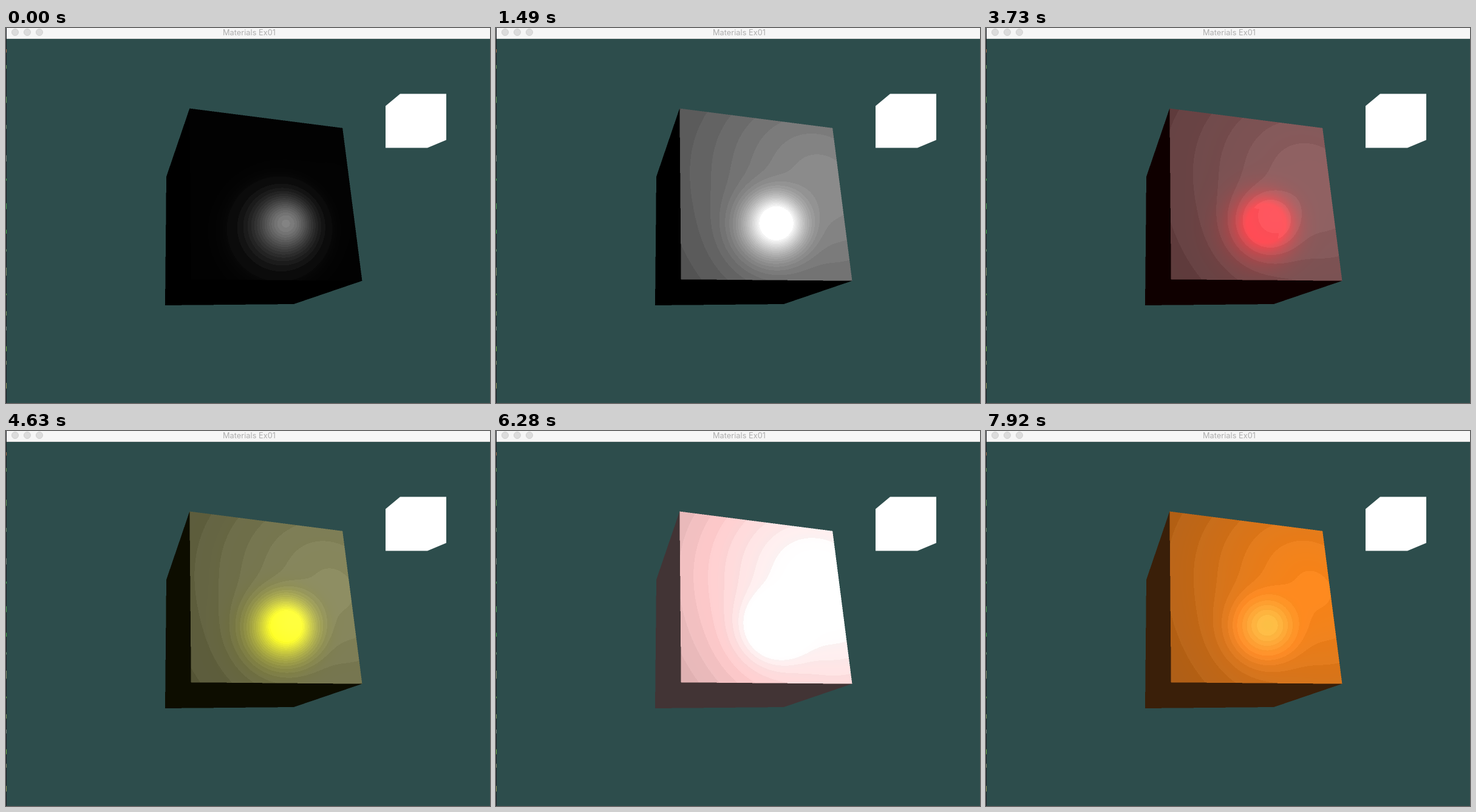
An HTML page with a canvas that plays this animation: 797x618 px, repeating every 8 s.

```html
<!DOCTYPE html>
<html lang="en">
<head>
<meta charset="utf-8">
<title>Materials Ex01</title>
<style>
html, body { margin: 0; width: 100%; height: 100%; overflow: hidden; background: #2d4d4c; }
svg, canvas { position: absolute; left: 0; top: 0; display: block; }
text { font-family: Inter, "Open Sans", sans-serif; font-size: 12.8px; }
</style>
</head>
<body>
<svg width="797" height="618" viewBox="0 0 797 618">
  <rect width="797" height="618" fill="#2d4d4c"/>
  <rect width="797" height="18" fill="#f6f6f6"/>
  <rect y="17" width="797" height="1" fill="#d6d6d6"/>
  <g fill="#dcdcdc" stroke="#d0d0d0">
    <circle cx="15" cy="7" r="5.5"/><circle cx="35" cy="7" r="5.5"/><circle cx="55" cy="7" r="5.5"/>
  </g>
  <text x="400.5" y="12" text-anchor="middle" fill="#adadad">Materials Ex01</text>
  <polygon id="lamp" fill="#fff"/>
  <g id="edge"><rect width="1" height="618" fill="#1c1e26"/></g>
</svg>
<canvas id="view" width="797" height="618"></canvas>
<script>
const $ = id => document.getElementById(id);

// Materials: ambient, diffuse and specular colour, and how long each is shown
const HOLD = 450;
const make = (ambient, diffuse, specular, hold = HOLD) => ({ ambient, diffuse, specular, hold });
const plastic = (on, high, low, shine, hold) =>
  make([0, 0, 0], on.map(m => m ? high : low), on.map(m => shine + 0.1 * m), hold);
const rubber = (on, hold) =>
  make(on.map(m => 0.05 * m), on.map(m => 0.4 + 0.1 * m), on.map(m => 0.04 + 0.66 * m), hold);
const gem = (color, share, shine, tint, hold) =>
  make(color.map(v => v * share), color, color.map(v => shine + tint * v), hold);

const grey = v => [v, v, v];
const white = [1, 1, 1], red = [1, 0, 0], green = [0, 1, 0], cyan = [0, 1, 1], yellow = [1, 1, 0];

const materials = [
  plastic(grey(0), 0, 0.01, 0.5, 150),
  make([0, 0.1, 0.06], [0, 0.51, 0.51], grey(0.5)),
  plastic(green, 0.35, 0.1, 0.45),
  plastic(red, 0.5, 0, 0.6, 440),
  plastic(white, 0.55, 0, 0.6),
  plastic(yellow, 0.5, 0, 0.5),
  make(grey(0.02), grey(0.01), grey(0.4), 440),
  ...[cyan, green, red, white, yellow].map(on => rubber(on)),
  gem([0.076, 0.614, 0.076], 0.284, 0.62, 0.17, 300),  // emerald
  gem([0.54, 0.89, 0.63], 0.25, 0.316, 0),             // jade
  gem([0.183, 0.17, 0.225], 0.294, 0.285, 0.27),       // obsidian
  gem([1, 0.829, 0.829], 0.25, 0.297, 0),              // pearl
  gem([0.614, 0.041, 0.041], 0.284, 0.62, 0.17),       // ruby
  gem([0.396, 0.742, 0.691], 0.2525, 0.285, 0.03, 440),// turquoise
  gem([0.78, 0.569, 0.114], 0.4, 0.78, 0.27, 300),     // brass
  gem([0.714, 0.428, 0.181], 0.298, 0.088, 0.425, 80)  // bronze
];
const LOOP = materials.reduce((sum, m) => sum + m.hold, 0);

// Scene: unit cube at the origin, tilted about the (1, -1, 0) axis
const FOCAL = 300 / Math.tan(Math.PI / 8), CX = 401, CY = 318, SHINE = 32;
const eye = [0, 0, 3], light = [0.75, 0.45, 1], LAMP = 0.1;
const tilt = 25.6 * Math.PI / 180, c = Math.cos(tilt), s = Math.sin(tilt) * Math.SQRT1_2;
const axes = [[(c + 1) / 2, (c - 1) / 2, -s], [(c - 1) / 2, (c + 1) / 2, -s], [s, s, c]];
const normal = axes[2];

const dot = (a, b) => a[0] * b[0] + a[1] * b[1] + a[2] * b[2];
const along = (a, b, t) => a.map((v, i) => v + b[i] * t);
const unit = a => a.map(v => v / Math.hypot(...a));
const origin = axes.map(a => dot(eye, a));

// Lamp outline, snapped to the half pixels of a double-density screen
const snap = v => Math.round(v * 2) / 2;
function corner(dx, dy, dz) {
  const [x, y, z] = along(light, [dx, dy, dz], LAMP);
  const scale = FOCAL / (eye[2] - z);
  return [snap(CX + x * scale), snap(CY - y * scale)];
}
$("lamp").setAttribute("points", [
  corner(-1, 1, 1), corner(1, 1, 1), corner(1, -1, 1),
  corner(1, -1, -1), corner(-1, -1, -1), corner(-1, 1, -1)
].join(" "));

// Slivers of the window behind, along the left border
let seed = 7;
const random = () => (seed = seed * 16807 % 2147483647) / 2147483647;
for (let y = 35; y < 600; y += 16 + 48 * random()) {
  const r = document.createElementNS("http://www.w3.org/2000/svg", "rect");
  const fill = `hsl(${20 + 110 * random()} ${50 * random()}% 45%)`;
  for (const [k, v] of Object.entries({ y, width: 1, height: 2 + 12 * random(), fill })) r.setAttribute(k, v);
  $("edge").append(r);
}

// Where a ray meets the face on one axis, or null
function hit(dir, axis, side) {
  const t = (side - origin[axis]) / dir[axis];
  const inside = axes.every((_, i) => i === axis || Math.abs(origin[i] + t * dir[i]) <= 0.5);
  return inside ? t : null;
}

function lighting(p) {
  const toLight = unit(along(light, p, -1));
  const toEye = unit(along(eye, p, -1));
  const diff = Math.max(dot(normal, toLight), 0);
  const mirror = along(toLight.map(v => -v), normal, 2 * dot(normal, toLight));
  return [diff, Math.max(dot(toEye, mirror), 0) ** SHINE];
}

// Four samples for each pixel: share of front and side faces, mean light on the front
function sample(x, y) {
  let front = 0, side = 0, diff = 0, spec = 0;
  for (const ox of [0.25, 0.75]) for (const oy of [0.25, 0.75]) {
    const ray = [(x + ox - CX) / FOCAL, (CY - y - oy) / FOCAL, -1];
    const dir = axes.map(a => dot(ray, a));
    const t = hit(dir, 2, 0.5);
    if (t !== null) {
      const [d, k] = lighting(along(eye, ray, t));
      front++;
      diff += d;
      spec += k;
    } else if (hit(dir, 0, -0.5) !== null || hit(dir, 1, -0.5) !== null) side++;
  }
  return { front, side, diff: diff / (front || 1), spec: spec / (front || 1) };
}

const box = { x: 260, y: 130, w: 330, h: 330 };
const pixels = [];
for (let j = 0; j < box.h; j++) for (let i = 0; i < box.w; i++) {
  const p = sample(box.x + i, box.y + j);
  if (p.front + p.side) pixels.push({ at: 4 * (j * box.w + i), ...p });
}

// Wide-gamut display values to sRGB bytes
const toLinear = v => v <= 0.04045 ? v / 12.92 : ((v + 0.055) / 1.055) ** 2.4;
const toGamma = v => v <= 0.0031308 ? Math.max(v, 0) * 12.92 : 1.055 * Math.min(v, 1) ** (1 / 2.4) - 0.055;
function display(color) {
  const [r, g, b] = color.map(v => toLinear(Math.min(v, 1)));
  return [1.2249 * r - 0.2249 * g, -0.042 * r + 1.042 * g, -0.0197 * r - 0.0786 * g + 1.0983 * b]
    .map(v => 255 * toGamma(v));
}

// Brightness moves in even bands, hue stays
const band = v => v < 7.2 ? v : v >= 247.2 ? 255 : 8 * Math.floor((v + 0.8) / 8) + 3;
function banded(color) {
  const luma = dot(color, [0.2126, 0.7152, 0.0722]);
  const shift = band(luma) - luma;
  return color.map(v => v + shift);
}

const ctx = $("view").getContext("2d");
const image = ctx.createImageData(box.w, box.h);

function paint({ ambient, diffuse, specular }) {
  const dark = display(ambient);
  for (const { at, front, side, diff, spec } of pixels) {
    const lit = front
      ? banded(display(ambient.map((a, i) => a + diffuse[i] * diff + specular[i] * spec)))
      : dark;
    const cover = front + side;
    for (let i = 0; i < 3; i++) image.data[at + i] = (lit[i] * front + dark[i] * side) / cover;
    image.data[at + 3] = 255 * cover / 4;
  }
  ctx.putImageData(image, box.x, box.y);
}

function materialAt(t) {
  let end = 0;
  return materials.find(m => t < (end += m.hold));
}

const start = performance.now();
let shown = null;
function frame() {
  const next = materialAt((performance.now() - start) % LOOP);
  if (next !== shown) {
    paint(next);
    shown = next;
  }
  requestAnimationFrame(frame);
}
frame();
</script>
</body>
</html>
```
